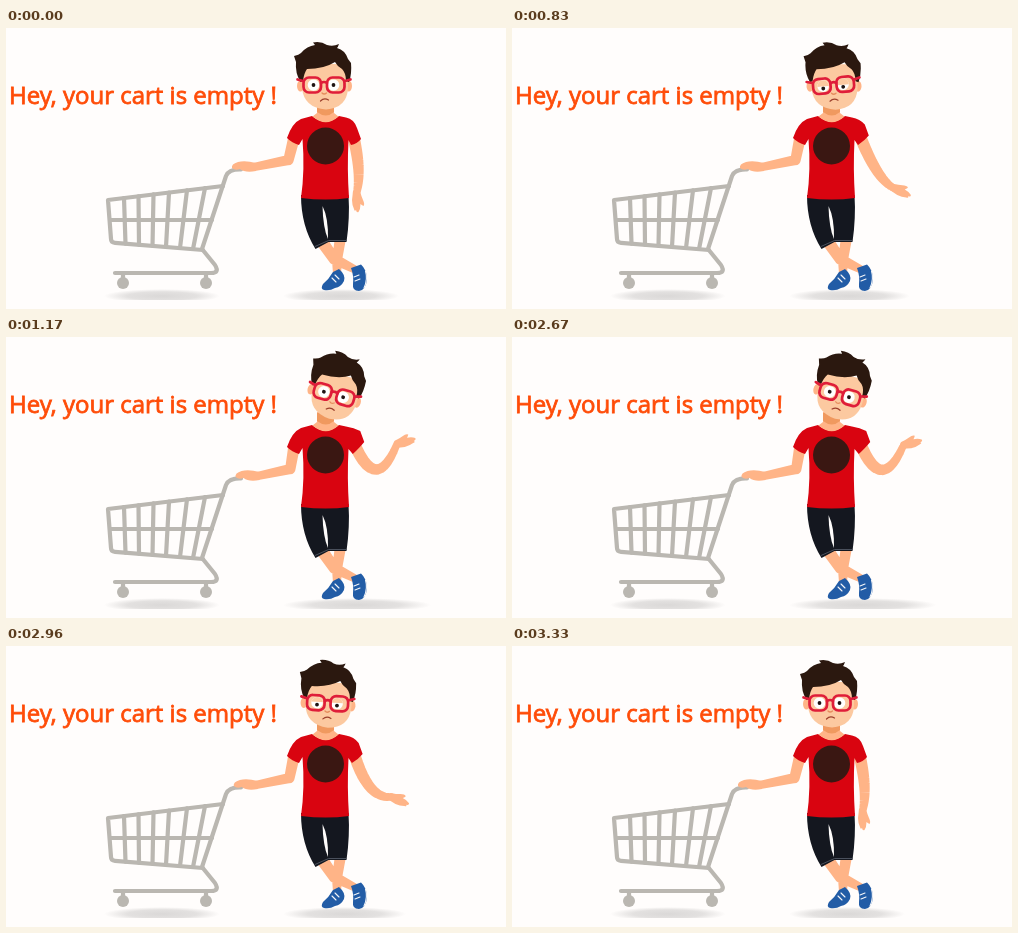
Recreate the animation shown at these times as an HTML page. Size 500x281 px, loop 3.83 s.

```html
<!DOCTYPE html>
<html lang="en">
<head>
<meta charset="utf-8">
<title>Empty cart</title>
<style>
  html, body { margin: 0; width: 100%; height: 100%; overflow: hidden; background: #fffdfc; }
  svg { display: block; width: 100%; height: 100%; }
  text { font: 24px "Open Sans", "Noto Sans", sans-serif; fill: #ff4c08; stroke: #ff4c08; stroke-width: .8; }
  .skin { fill: #ffb487; }
  .face { fill: #fcc9a0; }
  .shade { fill: #f0995f; }
  .hair { fill: #2b180f; }
  .shirt { fill: #d90410; }
  .pants { fill: #14171f; }
  .shoe { fill: #225ca6; }
  .line { fill: none; stroke-linecap: round; stroke-linejoin: round; }
  .cart { stroke: #bab7b1; stroke-width: 4.2; }
  .frames { stroke: #df1d39; stroke-width: 2.7; }
</style>
</head>
<body>
<svg viewBox="0 0 500 281">
  <defs>
    <radialGradient id="soft">
      <stop offset="0" stop-color="#dad8d7"/>
      <stop offset=".6" stop-color="#e3e1e0"/>
      <stop offset="1" stop-color="#fffdfc"/>
    </radialGradient>
    <clipPath id="eyes">
      <circle cx="307.5" cy="57" r="5.8"/><circle cx="327.5" cy="57" r="5.8"/>
    </clipPath>
    <clipPath id="floor"><path d="M0 0H500V272H0Z"/></clipPath>
  </defs>

  <g clip-path="url(#floor)" fill="url(#soft)">
    <ellipse cx="156" cy="268" rx="58" ry="7"/>
    <ellipse id="shadow" cy="268" ry="7"/>
  </g>

  <text x="3" y="76">Hey, your cart is empty !</text>

  <g class="line cart">
    <path d="M235 141.5Q223 141 220 148L196 221L209 237Q214 245 205 245H109"/>
    <path d="M217 158L102 172L105 211Q105 214.5 109 214.8L197 222M104 192H206"/>
    <path id="bars"/>
    <path d="M117 246V254M200 246V254"/>
  </g>
  <g fill="#bab7b1"><circle cx="117" cy="255" r="6"/><circle cx="200" cy="255" r="6"/></g>

  <path id="legs" class="skin"/>
  <g class="shoe">
    <path d="M327 244L333 241Q340 247 338 253Q335 259 329 260Q324 263 318 262Q314 261 317 256Q323 251 327 244Z"/>
    <path d="M345 240L355 236.500Q361 242 361 251Q360 262 353 263Q346 263 347 256Q348 248 345 240Z"/>
  </g>
  <g class="line" stroke="#f4f5f8" stroke-width="1.1">
    <path d="M326 250L330 254M329 247L333 251M348 249L353 247M349 253L354 251M359.500 243Q362 251 358 260"/>
  </g>
  <path class="pants" d="M295 167H342.500Q344 190 340.500 214L322.500 214L309.500 221Q295 198 295 167Z"/>
  <path fill="#fffdfc" d="M316.500 178Q322.500 190 322 211Q317 200 316.500 178Z"/>
  <path class="line" stroke="#4a505c" stroke-width="1" d="M309 218.500L322.500 212.500H340"/>

  <path id="armL" class="skin"/>
  <path id="handL" class="skin" d="M250 135Q239 132 232 134Q225 136 226 140Q229 143 234 141Q239 145 250 143Z"/>
  <path id="armR" class="skin"/>
  <path id="handR" class="skin" d="M-2 -3.500Q4 -5 7 -6.500Q11 -8.500 13 -7Q12 -5 11 -4Q16 -4 19 -2Q20 0 17 0.500Q19 2 16 2.500Q12 4.500 7 4.500Q3 4 -2 3.500Z"/>
  <path id="shirt" class="shirt"/>
  <circle cx="319.5" cy="118" r="18.5" fill="#3a1712"/>
  <path class="skin" d="M306.500 88.500L311 85V75H328V85L332.500 88.500Q320 100 306.500 88.500Z"/>
  <path class="shade" d="M311 76H328V84Q320 91 311 84Z"/>

  <g id="head">
    <ellipse class="skin" cx="294.5" cy="58" rx="3.5" ry="5.5"/>
    <ellipse class="skin" cx="342.5" cy="58" rx="3.5" ry="5.5"/>
    <path class="face" d="M296 36H342V60Q341 80 320 81.500Q298 80 296 60Z"/>
    <path class="hair" d="M294.500 54Q289 45 290 34L288 28Q293 27 295 25Q301 18 309 17L307 14.500Q315 13 321 17Q327 19 333 16Q332 19 331 20Q339 22 342 31L345 35Q346 46 343 54L340 53Q340 45 336 41Q331 38 329 34Q318 41 301 41Q298 45 297 53Z"/>
    <g id="gaze">
      <g clip-path="url(#eyes)">
        <path fill="#fff" d="M300 50H336V64H300Z"/>
        <g id="pupils" fill="#201514"><circle cx="307.5" cy="57" r="1.9"/><circle cx="327.5" cy="57" r="1.9"/></g>
        <rect id="lids" class="face" x="300" y="51" width="36"/>
      </g>
      <g class="line frames">
        <rect x="297.5" y="49.5" width="17.5" height="15" rx="5.5"/>
        <rect x="321" y="49.5" width="17.5" height="15" rx="5.5"/>
        <path d="M315 55Q318 53 321 55M297 53L291.500 51.500M339 53L344.500 51.500"/>
      </g>
    </g>
    <path class="line" stroke="#e58d5d" stroke-width="1.3" d="M316 65Q318 67 320.500 65"/>
    <path class="line" stroke="#9c3f2c" stroke-width="1.2" d="M314.500 73Q318 69.500 322.500 72"/>
  </g>
</svg>
<script>
const LOOP = 3830;
const $ = id => document.getElementById(id);
const set = (id, attrs) => { for (const k in attrs) $(id).setAttribute(k, attrs[k]); };

// Pose: head x, head turn, glasses tilt, elbow x/y, wrist x/y, hand turn, lean, shadow right edge
const REST = [0, 0, 0, 352.5, 142, 350.5, 165, 90, 0, 392];
const DROOP = [3.5, 0, -5, 365, 143, 381, 160, 28, 2, 397];
const LOW = [1.5, 0, -2, 362.5, 144, 376, 164, 46, 1, 391];
const OPEN = [7, 12, 0, 367, 138, 393, 127, 2, 3, 414];
const SHRUG = [10, 16, 0, 371, 132.5, 391, 107, -12, 3.6, 424];

const RAISE = [[710, REST], [830, DROOP], [970, OPEN], [1170, SHRUG]];
const LOWER = [[2630, SHRUG], [2830, OPEN], [3040, LOW], [3130, REST]];
const LIDS = [[500, 0], [580, 1], [870, 1], [1010, 0], [2850, 0], [2990, 1], [3210, 1], [3330, 0]];

// Smooth curve through the keys, at rest at both ends
function follow(keys, t) {
  const last = keys.length - 1;
  if (t <= keys[0][0]) return keys[0][1];
  if (t >= keys[last][0]) return keys[last][1];
  const i = keys.findIndex(k => k[0] > t) - 1;
  const [t0, a] = keys[i], [t1, b] = keys[i + 1];
  const h = t1 - t0, u = (t - t0) / h;
  const slope = (k, n) => k === 0 || k === last ? 0
    : (keys[k + 1][1][n] - keys[k - 1][1][n]) / (keys[k + 1][0] - keys[k - 1][0]);
  return a.map((v, n) => {
    const s = u * u * (3 - 2 * u);
    return v + (b[n] - v) * s + h * u * (1 - u) * ((1 - u) * slope(i, n) - u * slope(i + 1, n));
  });
}

function ramp(keys, t) {
  const i = keys.findIndex(k => k[0] > t);
  if (i < 1) return 0;
  const [t0, a] = keys[i - 1], [t1, b] = keys[i];
  return a + (b - a) * (t - t0) / (t1 - t0);
}

// Tapered limb with round joints, each joint being [x, y, radius]
function limb(...joints) {
  let d = '';
  joints.forEach(([x, y, r], i) => {
    d += `M${x - r} ${y}a${r} ${r} 0 1 1 ${2 * r} 0a${r} ${r} 0 1 1 ${-2 * r} 0Z`;
    if (!i) return;
    const [px, py, pr] = joints[i - 1];
    const len = Math.hypot(x - px, y - py), nx = (py - y) / len, ny = (x - px) / len;
    d += `M${px - nx * pr} ${py - ny * pr}L${x - nx * r} ${y - ny * r}` +
         `L${x + nx * r} ${y + ny * r}L${px + nx * pr} ${py + ny * pr}Z`;
  });
  return d;
}

// Limb that bends softly through the middle joint
function softLimb(a, mid, b) {
  const at = u => a.map((v, n) => {
    const c = 2 * mid[n] - (v + b[n]) / 2;
    return (1 - u) ** 2 * v + 2 * u * (1 - u) * c + u * u * b[n];
  });
  return limb(...Array.from({ length: 13 }, (_, i) => at(i / 12)));
}

function draw(t) {
  const [hx, turn, tilt, ex, ey, wx, wy, hand, lean, right] =
    t < 2000 ? follow(RAISE, t) : follow(LOWER, t);
  const lid = ramp(LIDS, t);

  set('head', { transform: `translate(${hx} ${hx * 0.06}) rotate(${turn} 318 57)` });
  set('gaze', { transform: `rotate(${tilt} 318 57)` });
  set('lids', { height: 0.4 + lid * 6 });
  set('pupils', { transform: `translate(0 ${lid * 2.4})` });

  set('armR', { d: softLimb([348 + lean * 0.6, 111, 6], [ex, ey, 5.2], [wx, wy, 3.6]) });
  set('handR', { transform: `translate(${wx} ${wy}) rotate(${hand})` });
  set('armL', { d: limb([288, 110, 5.8], [282.5 + lean * 0.5, 132, 5.2], [248 + lean, 139, 4]) });
  set('handL', { transform: `translate(${lean} 0)` });

  const tip = 355 + lean * 0.9, drop = 111 - lean * 1.7;
  set('shirt', {
    d: `M306 88Q319.500 99 333 88L340 89.500Q348 91 ${tip - 4} ${drop - 11}L${tip} ${drop}` +
       `Q${tip - 4} ${drop + 5} ${345 + lean * 0.5} 117L342.500 112Q341 140 343 170Q320 173 295 170` +
       `Q299 142 296.500 111L293 117Q286 115 281 110Q286 95 295 91Z`
  });
  set('shadow', { cx: (278 + right) / 2, rx: (right - 278) / 2 + 1 });
}

const bars = [[118, 119.5], [132.5, 133], [147.5, 146.5], [163, 160], [181, 174], [199, 187]];
set('bars', {
  d: bars.map(([a, b]) => `M${a} ${172 - (a - 102) * 0.122}L${b} ${214.5 + (b - 106) * 0.08}`).join('')
});
set('legs', {
  d: limb([317, 215, 6], [328, 231, 5.5], [350, 242, 4]) + limb([334, 213, 5.5], [331, 232, 5], [331, 246, 4])
});

const start = performance.now();
function tick() {
  draw((performance.now() - start) % LOOP);
  requestAnimationFrame(tick);
}
tick();
</script>
</body>
</html>
```
